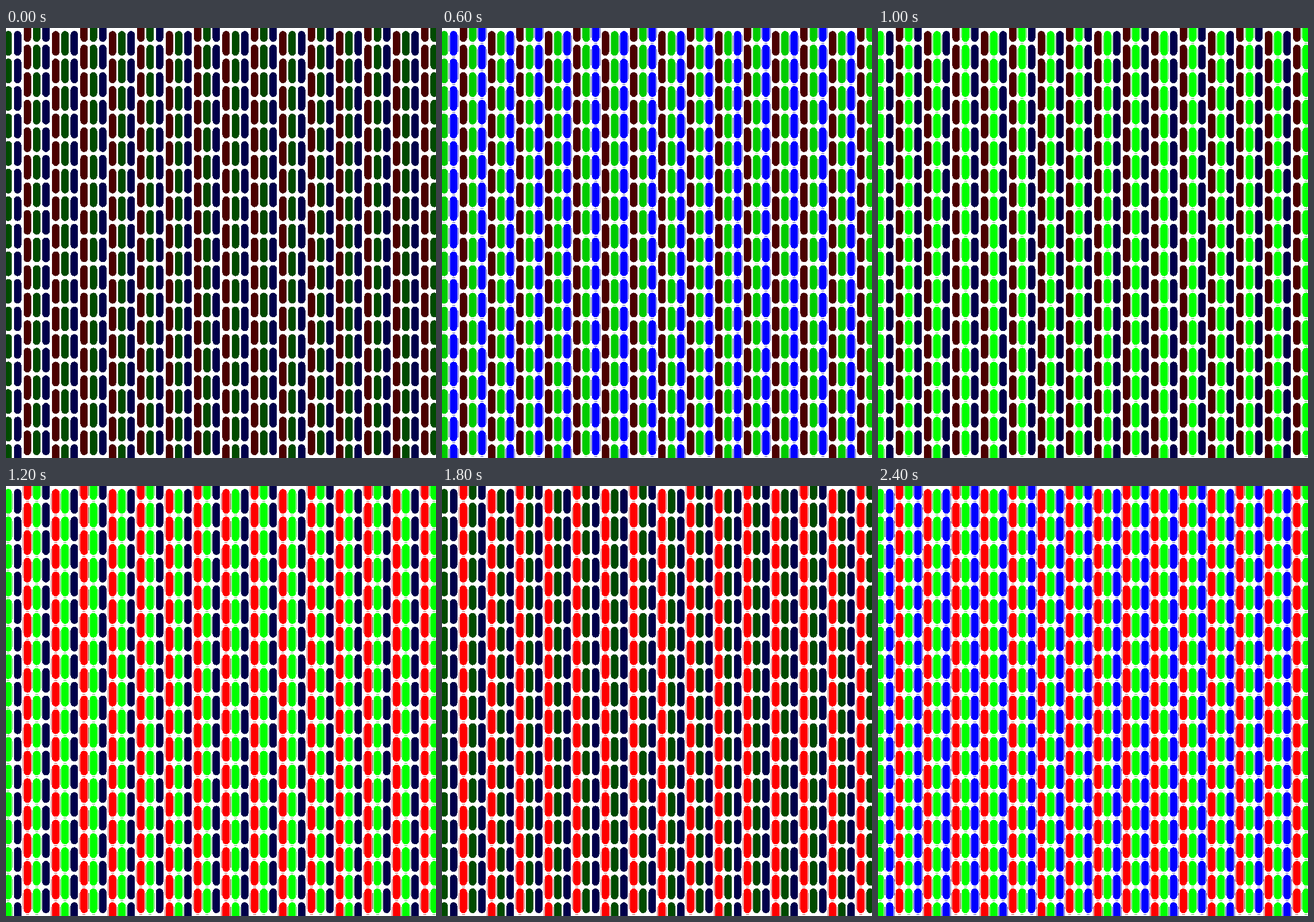
These frames come from a looping animation (748 by 748 pixels, 2.6 s). An HTML page without scripts:

```html
<!DOCTYPE html>
<html lang="en">
<head>
<meta charset="utf-8">
<title>Subpixels</title>
<style>
html, body { margin: 0; width: 100%; height: 100%; overflow: hidden; background: #fff; }
svg { display: block; width: 748px; height: 748px; shape-rendering: crispEdges; }

.pill { stroke: currentColor; stroke-opacity: 1; stroke-width: 13; stroke-linecap: round; stroke-dasharray: 30 17.93; }
.edge, .tick { stroke: color-mix(in srgb, currentColor 65%, #000); }
.edge { stroke-width: 1; stroke-dasharray: 28 19.93; stroke-dashoffset: -1; }
.tick { stroke-width: 5; stroke-dasharray: 1 46.93; stroke-dashoffset: -38.5; }

/* stroke-opacity is the strength of the fringe around lit pills */
.r, .g, .b { animation: red 2.6s step-end infinite; }
.g { animation-name: green; }
.b { animation-name: blue; }

@keyframes red {
  0%, 15.38% { color: #4b0000; stroke-opacity: 0; }
  7.69% { color: #820000; stroke-opacity: 0; }
  46.15%, 100% { color: #f00; stroke-opacity: .7; }
}
@keyframes green {
  0%, 69.23% { color: #004b00; stroke-opacity: 0; }
  23.07%, 53.84% { color: #0c0; stroke-opacity: .4; }
  30.76% { color: #0f0; stroke-opacity: .7; }
  61.53%, 84.61% { color: #008200; stroke-opacity: 0; }
  92.3%, 100% { color: #0f0; stroke-opacity: .7; }
}
@keyframes blue {
  0%, 38.46% { color: #00004b; stroke-opacity: 0; }
  7.69% { color: #00f; stroke-opacity: .7; }
  30.76% { color: #0000e6; stroke-opacity: .5; }
  76.92%, 100% { color: #00f; stroke-opacity: .7; }
}
</style>
</head>
<body>
<svg viewBox="0 0 748 748" fill="none">
  <defs>
    <!-- two staggered columns, doubled up to fill the width -->
    <path id="c2" d="M-61.7-12.4V800M-12.3 11.7V800"/>
    <g id="c4"><use href="#c2"/><use href="#c2" x="98.8"/></g>
    <g id="c8"><use href="#c4"/><use href="#c4" x="197.6"/></g>
    <g id="cols"><use href="#c8"/><use href="#c8" x="395.2"/><use href="#c2" x="790.4"/></g>
    <g id="sub">
      <use href="#cols" class="edge" x="-8"/>
      <use href="#cols" class="edge" x="8"/>
      <use href="#cols" class="tick"/>
      <use href="#cols" class="pill"/>
    </g>
  </defs>
  <use href="#sub" class="r"/>
  <use href="#sub" class="g" x="16.2"/>
  <use href="#sub" class="b" x="32.4"/>
</svg>
</body>
</html>
```
